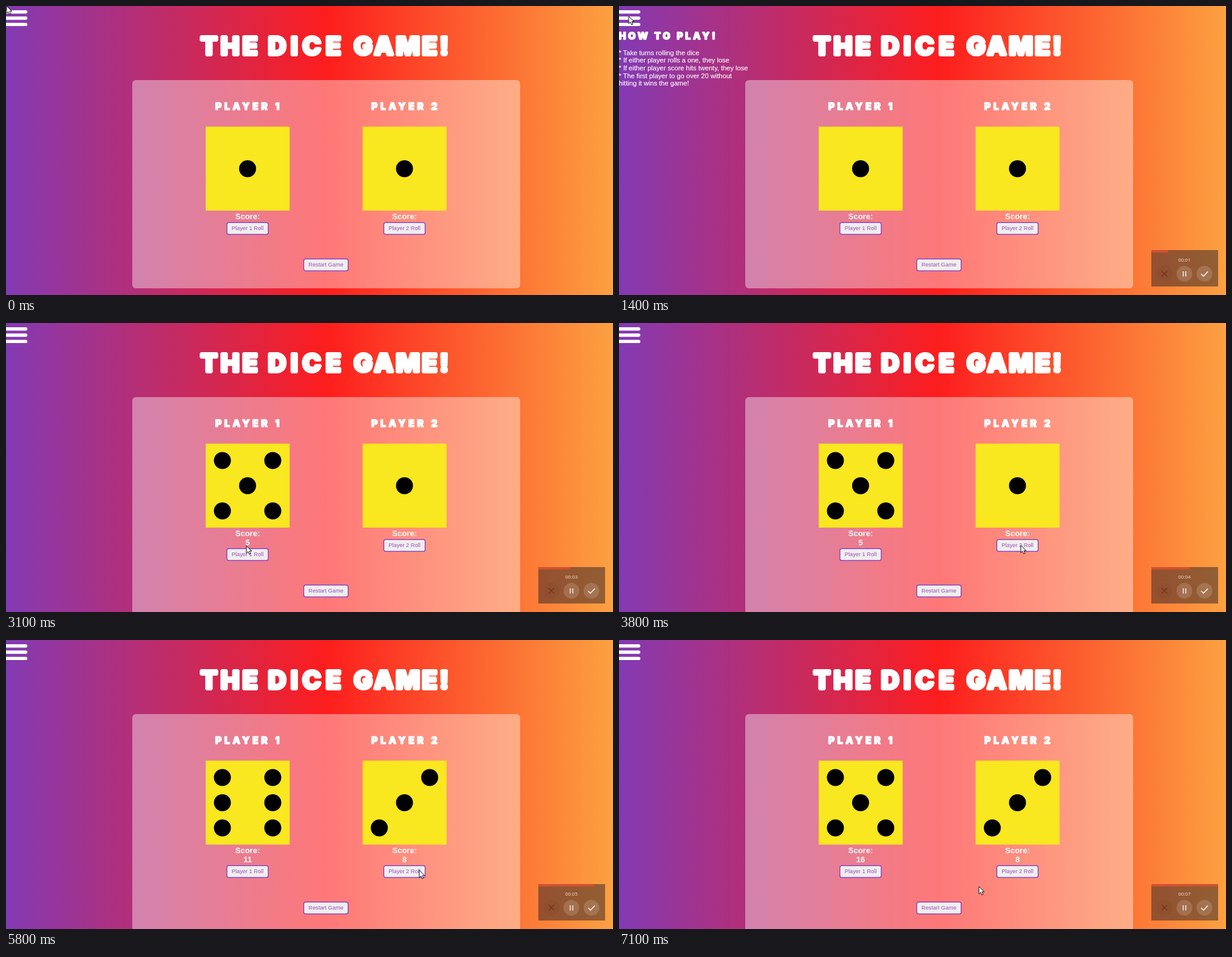
An HTML page for the animation above (7200 ms loop, 1000 px wide and 476 px high).

```html
<!DOCTYPE html>
<html lang="en">
<head>
<meta charset="utf-8">
<title>The Dice Game</title>
<style>
  html, body { margin: 0; width: 100%; height: 100%; overflow: hidden; }
  body { background: linear-gradient(90deg, #833ab4 0, #fd1d1d 527px, #fcb045 1055px); }
  svg { display: block; width: 1000px; height: 476px; }
  text { fill: #fff; font-family: "Liberation Sans", Arial, sans-serif; }
  .display { font-family: Inter, sans-serif; font-weight: 900; stroke: #fff; stroke-linejoin: bevel; }
  .title { font-size: 42px; stroke-width: 4px; }
  .head { font-size: 16px; stroke-width: 1.5px; }
  .mid { text-anchor: middle; }
  .score { font-size: 13px; font-weight: 700; }
  .rules { font-size: 11.08px; stroke: #fff; stroke-width: .15px; }
  .btn rect { fill: #efefef; stroke: #7a2fc0; stroke-width: 1.2; }
  .btn text { fill: #a04cba; font-size: 9.25px; }
  .clock { font: 8px "Open Sans", "Noto Sans", sans-serif; fill: #f3e4d6; }
  .icon { fill: none; stroke: #f7e9de; stroke-width: 1.6; }
</style>
</head>
<body>
<svg id="stage" viewBox="0 0 1000 476">
  <path d="M-4 9.7H32.5M-4 20H32.5M-4 30.4H32.5" stroke="#fff" stroke-width="5.4" stroke-linecap="round"/>

  <g id="menu">
    <text class="display head" x="-0.5" y="55.3" letter-spacing="3.6">HOW TO PLAY!</text>
    <g id="rules" class="rules"></g>
  </g>

  <text class="display title" y="81"><tspan x="320" letter-spacing="4.5">THE</tspan><tspan x="431.5" letter-spacing="7">DICE</tspan><tspan x="572.5" letter-spacing="3">GAME!</tspan></text>

  <rect id="panel" x="208" y="122" width="639" height="343" rx="6" fill="#fff" fill-opacity=".4"/>
  <g id="players"></g>
  <g id="restart" class="btn">
    <rect x="490.6" y="416.6" width="73" height="19.6" rx="3"/>
    <text class="mid" x="527" y="429.3">Restart Game</text>
  </g>

  <g id="recorder">
    <rect x="877" y="402" width="110" height="60" fill="#2d2328" fill-opacity=".5"/>
    <rect id="bar" x="877" y="402" height="4" fill="#d2502f"/>
    <text id="clock" class="clock mid" x="931.5" y="420.6"></text>
    <circle cx="898.5" cy="441" r="13" fill="#8a4a2c" fill-opacity=".35"/>
    <circle cx="931.5" cy="441" r="13" fill="#fff" fill-opacity=".15"/>
    <circle cx="964.5" cy="441" r="13" fill="#fff" fill-opacity=".15"/>
    <path d="M894 436.5l9 9M903 436.5l-9 9" stroke="#70331f" stroke-width="1.3"/>
    <path class="icon" d="M929.5 437v8.4M933.7 437v8.4"/>
    <path class="icon" d="M959 441.2l3.8 3.8 7.4-7.6"/>
  </g>

  <path id="cursor" d="M0 0V12.2L2.8 9.6L4.8 14L6.9 13L5 8.8H8.8Z" fill="#fff" stroke="#111" stroke-width="1"/>
</svg>
<script>
const LOOP = 7200, STEP = 100, ROW = 15;
const $ = id => document.getElementById(id);

const rules = [
  "* Take turns rolling the dice",
  "* If either player rolls a one, they lose",
  "* If either player score hits twenty, they lose",
  "* The first player to go over 20 without",
  "hitting it wins the game!"
];
$("rules").innerHTML = rules
  .map((line, i) => `<text x="-0.5" y="${80.5 + i * 12.7}">${line}</text>`).join("");

// Pip positions on a 3 x 3 grid, numbered row by row
const pips = { 1: [4], 3: [2, 4, 6], 5: [0, 2, 4, 6, 8], 6: [0, 2, 3, 5, 6, 8] };

// Each roll: time, die face, score after it
const players = [
  { x: 398, rolls: [[0, 1, ""], [2900, 5, 5], [4500, 6, 11], [6500, 5, 16]] },
  { x: 656.5, rolls: [[0, 1, ""], [3900, 5, 5], [5700, 3, 8]] }
];

// Cursor tip: time, x, y
const path = [
  [0, 1, 0], [200, 1, 0], [700, 16, 17], [1700, 16, 17],
  [2400, 367, 396], [2700, 396, 366], [3100, 396, 367],
  [3700, 662, 366], [4000, 662, 367], [4400, 408, 381], [4600, 412, 382],
  [4800, 445, 383], [5000, 490, 384], [5500, 680, 380], [5900, 681, 379],
  [6400, 410, 381], [6600, 412, 382], [7100, 593, 406]
];

players.forEach((p, i) => {
  const g = document.createElementNS("http://www.w3.org/2000/svg", "g");
  g.setAttribute("transform", `translate(${p.x} 0)`);
  g.innerHTML = `
    <text class="display head mid" x="1.8" y="171.3" letter-spacing="4.5">PLAYER ${i + 1}</text>
    <rect x="-69" y="198.7" width="138.3" height="138.3" fill="#f9e71f"/>
    <g class="face"></g>
    <text class="score mid" y="351">Score:</text>
    <text class="score mid total" y="366"></text>
    <g class="btn">
      <rect x="-34" y="356.6" width="68" height="19.6" rx="3"/>
      <text class="mid" y="369.2">Player ${i + 1} Roll</text>
    </g>`;
  $("players").append(g);
  p.face = g.querySelector(".face");
  p.total = g.querySelector(".total");
  p.button = g.querySelector(".btn");
});

const pip = n =>
  `<circle cx="${(n % 3 - 1) * 41.5}" cy="${268 + (Math.floor(n / 3) - 1) * 41.5}" r="14"/>`;
const shift = (el, y) => el.setAttribute("transform", `translate(0 ${y})`);
const show = (el, on) => el.setAttribute("visibility", on ? "visible" : "hidden");

function tipAt(t) {
  const i = path.findIndex(k => k[0] > t);
  if (i < 0) return path[path.length - 1].slice(1);
  const [t0, x0, y0] = path[i - 1], [t1, x1, y1] = path[i];
  const u = (t - t0) / (t1 - t0), e = u * u * (3 - 2 * u);
  return [x0 + (x1 - x0) * e, y0 + (y1 - y0) * e];
}

function draw(t) {
  let extra = 0;
  for (const p of players) {
    const [, face, score] = p.rolls.filter(r => r[0] <= t).pop();
    const drop = score === "" ? 0 : ROW;
    p.face.innerHTML = pips[face].map(pip).join("");
    p.total.textContent = score;
    shift(p.button, drop);
    extra = Math.max(extra, drop);
  }
  shift($("restart"), extra);
  $("panel").setAttribute("height", 343 + extra);

  show($("menu"), t >= 700 && t < 1800);

  const sec = t * 0.00095 + 0.465;
  show($("recorder"), t >= 200);
  $("bar").setAttribute("width", Math.min(110, sec * 15.4));
  $("clock").textContent = "00:0" + Math.floor(sec);

  $("cursor").setAttribute("transform", `translate(${tipAt(t)})`);
}

function tick() {
  const t = performance.now() % LOOP;
  draw(Math.floor(t / STEP) * STEP);
  requestAnimationFrame(tick);
}
tick();
</script>
</body>
</html>
```
